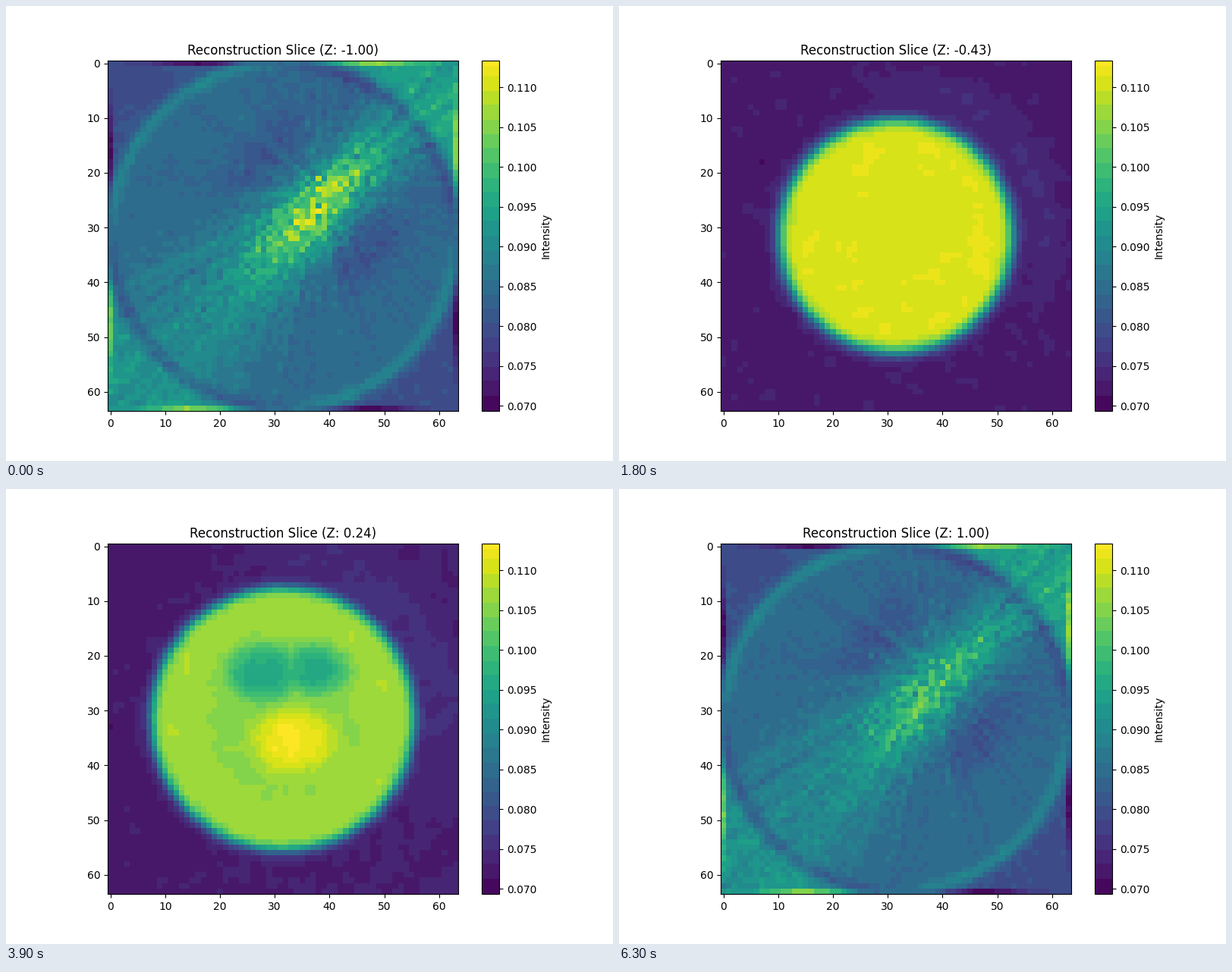
Animation of 800x600 px, one loop 6400 ms. Source, as a matplotlib script:

```python
import numpy as np
import matplotlib.pyplot as plt
from matplotlib.animation import FuncAnimation
from matplotlib.colors import ListedColormap

N = 64
MID = (N - 1) / 2
LOW, HIGH = 0.06938, 0.11338
BANDS = 24

rng = np.random.default_rng(7)
Y, X = np.mgrid[0:N, 0:N].astype(float)
DX, DY = X - MID, Y - MID
RHO = np.hypot(DX, DY)
ANGLE = np.degrees(np.arctan2(DY, DX))
ALONG = (DX - DY) / np.sqrt(2)    # towards the upper right
ACROSS = (DX + DY) / np.sqrt(2)
QUAD = -2 * DX * DY / RHO**2      # +1 upper right / lower left, -1 the others


def sigmoid(x):
    return 1 / (1 + np.exp(-np.clip(x, -40, 40)))


def bell(x, center, width, power=2):
    return np.exp(-np.abs((x - center) / width) ** power)


def blob(cx, cy, sx, sy, power=2):
    """Elliptic bump; a higher power gives a flatter top."""
    return np.exp(-(((X - cx) / sx) ** 2 + ((Y - cy) / sy) ** 2) ** (power / 2))


def make_noise():
    """Unit noise, slightly smoothed in the plane and between slices."""
    raw = rng.normal(size=(N, N, N))
    soft = raw.copy()
    for axis in range(3):
        soft = soft + 0.6 * (np.roll(soft, 1, axis) + np.roll(soft, -1, axis))
    return raw, soft / soft.std()


def banded_viridis():
    t = np.linspace(0, 1, 256)
    level = (np.minimum(np.floor(t * BANDS), BANDS - 1) + 0.5) / BANDS
    level[t > 0.958] = 0.97
    level[t > 0.985] = 1.0
    return ListedColormap(plt.get_cmap("viridis")(level))


GRAIN, SOFT = make_noise()
RAYS = np.interp(np.arctan2(DY + 8, DX - 7),
                 np.linspace(-np.pi, np.pi, 170), rng.normal(size=170))


def end_slice(i, z):
    """Streaky pattern that fills the first and last slices."""
    gain = 0.40 if z < 0 else 0.25
    spread = 6.5 + 0.2 * np.maximum(0, 8 - ALONG)
    core = bell(ALONG, 8, 14) * bell(ACROSS, 1, 0.7 * spread)
    v = 0.34 + gain * core + 0.12 * bell(ACROSS, 0, spread)
    v -= 0.09 * bell(np.abs(ACROSS), 13, 4) * bell(ALONG, 8, 9)

    corner = np.where(QUAD > 0, np.where(DX > 0, 0.57, 0.51), 0.24)
    outside = sigmoid((RHO - 32.8) / 0.6)
    v += (corner - v) * outside
    v -= 0.12 * bell(RHO, 31.5, 1.3) * np.tanh(3 * QUAD)

    edge = np.maximum(np.abs(DX), np.abs(DY)) > MID - 0.5
    bump = bell(np.minimum(np.abs(DX), np.abs(DY)), 16, 8)
    v += edge * bump * np.where(QUAD > 0, 0.27, -0.21)

    v += (0.006 + 0.032 * bell(ACROSS, 0, 14)) * RAYS
    v += (0.006 + 0.2 * gain * core + 0.02 * bell(ACROSS, 0, 13)) * GRAIN[i]
    return v


def inside_ball(i, z):
    v = 0.965 + 0.01 * z - 0.14 * bell(z, 0.08, 0.27)
    v = v - 0.1 * bell(z, 0, 0.3) * sigmoid((15 - RHO) / 2)
    core = bell(z, 0.02, 0.35, 6)
    hollow = np.maximum(blob(28, 23, 7, 5.2, 4), blob(37.5, 22.5, 6, 4.6, 4))
    v -= 0.22 * core * hollow
    v += 0.18 * core * blob(33.5, 35.5, 7.5, 6, 4)
    v += 0.025 * bell(z, -0.27, 0.2) * blob(46.5, 36, 4, 9)
    v -= 0.02 * bell(z, 0.52, 0.1) * blob(31.5, 30, 5, 5, 4)
    return v + 0.007 * SOFT[i]


def slice_values(i):
    z = -1 + 2 * i / (N - 1)
    depth = abs(z)

    # Cross-section of the ball, with a softer rim close to its poles.
    area = 25.2**2 - (MID * z) ** 2
    radius = np.sqrt(60 * np.logaddexp(0, area / 60))
    rim = 0.6 * 25.2 / max(radius, 5)
    disc = sigmoid((radius - RHO) / rim) * sigmoid((0.84 - depth) / 0.015)

    v = 0.057 + 0.05 * bell(z, -0.06, 0.33) + 0.0004 * DX * bell(z, 0.1, 0.3)
    haze = bell(RHO, radius + 6, 4) * bell(ANGLE, -38, 62, 4)
    v = v + 0.05 * haze + 0.009 * SOFT[i]

    mix = max(0, (depth - 0.6) / 0.4) ** 2.5
    if mix > 0:
        v = v * (1 - mix) + end_slice(i, z) * mix
    v = v + (inside_ball(i, z) - v) * disc
    return LOW + (HIGH - LOW) * np.clip(v, 0, 1)


fig, ax = plt.subplots(figsize=(8, 6), dpi=100)
image = ax.imshow(slice_values(0), cmap=banded_viridis(), vmin=LOW, vmax=HIGH)
fig.colorbar(image, ax=ax, label="Intensity")
title = ax.set_title("")


def update(i):
    image.set_data(slice_values(i))
    title.set_text(f"Reconstruction Slice (Z: {-1 + 2 * i / (N - 1):.2f})")
    return image, title


anim = FuncAnimation(fig, update, frames=N, interval=100, repeat=True)
plt.show()
```
